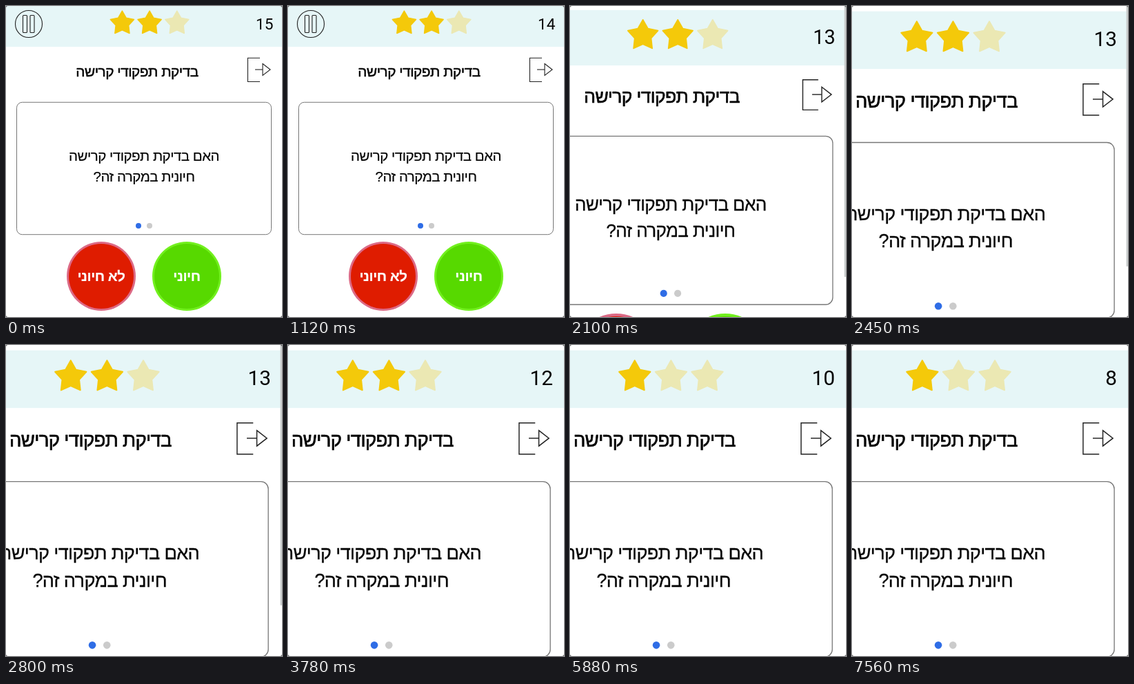
Write an HTML page with a canvas that moves like this. It is 400 px wide and 450 px high and loops after 7.77 s.

```html
<!DOCTYPE html>
<html lang="he">
<head>
<meta charset="utf-8">
<style>
html, body { margin: 0; width: 100%; height: 100%; overflow: hidden; background: #fff; }
canvas { display: block; width: 400px; height: 450px; }
</style>
</head>
<body>
<canvas id="stage"></canvas>
<script>
const W = 400, H = 450, LOOP = 7770, STEP = 70;
const INK = '#050505';
const HEBREW = '"Liberation Sans", Arial, sans-serif';
const canvas = document.getElementById('stage');
const ctx = canvas.getContext('2d');
const dpr = window.devicePixelRatio || 1;
canvas.width = W * dpr;
canvas.height = H * dpr;

const clamp = v => Math.min(1, Math.max(0, v));
const easeOut = u => 1 - (1 - u) ** 2;

function line(points, close) {
  ctx.beginPath();
  points.forEach(([x, y]) => ctx.lineTo(x, y));
  if (close) ctx.closePath();
  ctx.stroke();
}

function box(x, y, w, h, r) {
  ctx.beginPath();
  ctx.roundRect(x, y, w, h, r);
  ctx.stroke();
}

function disc(x, y, r, fill) {
  ctx.beginPath();
  ctx.arc(x, y, r, 0, Math.PI * 2);
  ctx.fillStyle = fill;
  ctx.fill();
}

function hebrew(text, x, y, { size = 20.5, weight = 400, color = INK, bolder = 0.2 } = {}) {
  ctx.font = `${weight} ${size}px ${HEBREW}`;
  ctx.letterSpacing = '-0.5px';
  ctx.direction = 'rtl';
  ctx.textAlign = 'center';
  ctx.lineWidth = bolder;
  ctx.fillStyle = ctx.strokeStyle = color;
  ctx.fillText(text, x, y);
  ctx.strokeText(text, x, y);
}

function star(x, y, color) {
  ctx.beginPath();
  for (let i = 0; i < 10; i++) {
    const r = i % 2 ? 9.8 : 18;
    const a = -Math.PI / 2 + i * Math.PI / 5;
    ctx.lineTo(x + r * Math.cos(a), y + r * Math.sin(a));
  }
  ctx.closePath();
  ctx.lineJoin = 'round';
  ctx.lineWidth = 1.4;
  ctx.fillStyle = ctx.strokeStyle = color;
  ctx.fill();
  ctx.stroke();
}

function header(seconds) {
  ctx.fillStyle = '#e6f6f7';
  ctx.fillRect(-10, -4, 420, 63);

  ctx.strokeStyle = '#222';
  ctx.lineWidth = 1.1;
  ctx.beginPath();
  ctx.arc(33, 26, 19.5, 0, Math.PI * 2);
  ctx.stroke();
  box(24.5, 13.5, 6, 25, 1);
  box(35, 13.5, 6, 25, 1);

  // A one-digit counter leaves the centred stars more room.
  const shift = seconds < 10 ? 6.1 : 0;
  const lit = seconds > 10 ? 2 : 1;
  for (let i = 0; i < 3; i++) {
    star(168.4 + shift + i * 39.7, 25, i < lit ? '#f4c90a' : '#ebe8b3');
  }

  ctx.font = '22.5px Roboto, sans-serif';
  ctx.letterSpacing = '0px';
  ctx.direction = 'ltr';
  ctx.textAlign = 'right';
  ctx.fillStyle = INK;
  ctx.fillText(seconds, 387.4, 34.3);
}

function exitIcon() {
  ctx.strokeStyle = '#222';
  ctx.lineWidth = 1.1;
  ctx.lineJoin = 'miter';
  line([[368, 75.3], [350.4, 75.3], [350.4, 109.5], [368, 109.5]]);
  line([[361, 92], [372, 92]]);
  line([[372, 83.5], [383, 92], [372, 100.5]], true);
}

function card() {
  ctx.strokeStyle = '#777';
  ctx.lineWidth = 1;
  box(15.5, 139.3, 369, 191.4, 8);
  hebrew('האם בדיקת תפקודי קרישה', 200, 224);
  hebrew('חיונית במקרה זה?', 200, 254);
  disc(192, 318, 4, '#2f6de6');
  disc(208, 318, 4, '#cbcbcb');
}

function button(x, label, fill, rim) {
  disc(x, 391, 50, rim);
  disc(x, 391, 47, fill);
  hebrew(label, x, 398, { weight: 700, color: '#fff' });
}

function scrollBar(t, scale) {
  if (t < 1540) return;
  ctx.globalAlpha = 1 - clamp((t - 3150) / 350);
  ctx.fillStyle = '#cacdcd';
  ctx.fillRect(397.5, 0, 2.5, Math.min(H, 499 / scale));
  ctx.globalAlpha = 1;
}

function corners() {
  ctx.beginPath();
  ctx.rect(0, 0, W, H);
  ctx.roundRect(0, 0, W, H, 3);
  ctx.fillStyle = '#555';
  ctx.fill('evenodd');
}

function draw(t) {
  const seconds = t < 980 ? 15 : 14 - Math.floor((t - 980) / 1050);
  const zoom = 0.325 * easeOut(clamp((t - 1520) / 965));

  ctx.setTransform(dpr, 0, 0, dpr, 0, 0);
  ctx.fillStyle = '#fff';
  ctx.fillRect(0, 0, W, H);

  ctx.save();
  ctx.translate(-398 * zoom, 40 * zoom);
  ctx.scale(1 + zoom, 1 + zoom);
  header(seconds);
  hebrew('בדיקת תפקודי קרישה', 190, 101.5, { size: 20.8, bolder: 0.5 });
  exitIcon();
  card();
  button(138, 'לא חיוני', '#df1c00', '#dc6a86');
  button(262, 'חיוני', '#57d900', '#72f01e');
  ctx.restore();

  scrollBar(t, 1 + zoom);
  corners();
}

const start = performance.now();
function tick() {
  const t = (performance.now() - start) % LOOP;
  draw(Math.floor(t / STEP) * STEP);
  requestAnimationFrame(tick);
}
tick();
</script>
</body>
</html>
```
